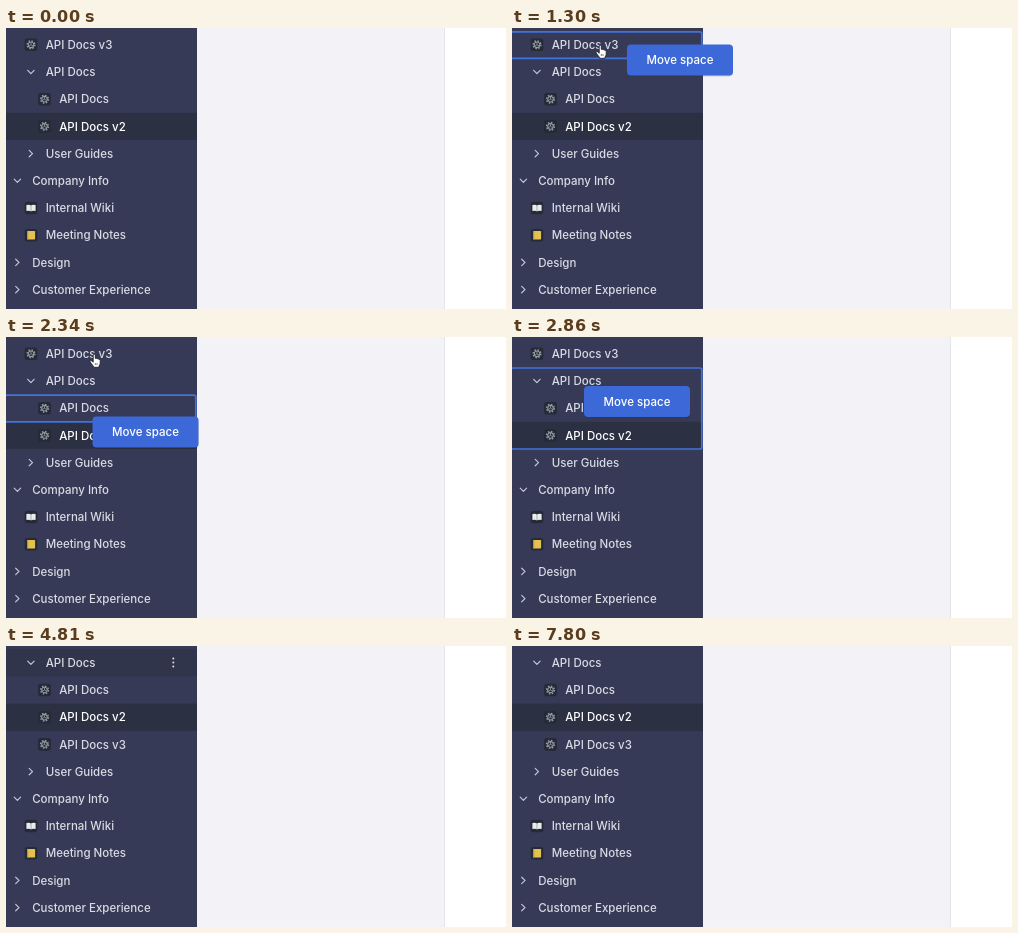
Animation, 500 px wide and 281 px high, one loop 8.97 s. Source, as an HTML page:

```html
<!DOCTYPE html>
<html lang="en">
<head>
<meta charset="utf-8">
<title>Move a space</title>
<style>
html, body { margin: 0; width: 100%; height: 100%; overflow: hidden; background: #fff; }
svg { display: block; width: 500px; height: 281px; }
text { font: 500 11.5px Inter, "Open Sans", sans-serif; fill: #d9dbe4; }
.line { fill: none; stroke: #c3c6d2; stroke-width: 1.2; stroke-linecap: round; stroke-linejoin: round; }
</style>
</head>
<body>
<svg id="stage" viewBox="0 0 500 281"></svg>
<script>
const LOOP = 8970, STEP = 130, ROW = 27.2, TOP = 3.2, SIDE = 191;
const stage = document.getElementById('stage');

// name, indent level, icon
const v3 = ['API Docs v3', 1, 'gear'];
const group = ['API Docs', 1, 'open'];
const docs = ['API Docs', 2, 'gear'];
const v2 = ['API Docs v2', 2, 'gear'];
const rest = [
  ['User Guides', 1, 'closed'], ['Company Info', 0, 'open'],
  ['Internal Wiki', 1, 'book'], ['Meeting Notes', 1, 'note'],
  ['Design', 0, 'closed'], ['Customer Experience', 0, 'closed']
];
const before = [v3, group, docs, v2, ...rest];
const after = [group, docs, v2, ['API Docs v3', 2, 'gear'], ...rest];

// time, hovered row (-1: none)
const hovers = [[0, -1], [260, 9], [390, 6], [520, 3], [650, 0], [1170, -1], [3900, 1],
  [4810, 0], [7150, 1], [7280, 2], [7410, 3], [7540, 4], [7670, 6], [7800, -1]];
// time, left, top of the dragged label
const drag = [[1170, 103, 16], [1300, 115, 16.5], [1560, 148, 25], [1690, 153, 36],
  [1950, 132, 62], [2080, 112, 73], [2340, 86.5, 79.5], [2600, 78, 65], [2860, 72, 49]];

const rect = (x, y, w, h, fill, r = 0, more = '') =>
  `<rect x="${x}" y="${y}" width="${w}" height="${h}" rx="${r}" fill="${fill}" ${more}/>`;
const at = (x, y, body) => `<g transform="translate(${x} ${y})">${body}</g>`;
const tile = rect(-6.3, -6.3, 12.6, 12.6, '#252a37', 2.5);
const icons = {
  open: '<path class="line" d="M-3.2-1.7 0 1.6 3.2-1.7"/>',
  closed: '<path class="line" d="M-1.7-3.2 1.6 0-1.7 3.2"/>',
  gear: tile + `<g fill="none" stroke="#969da6">
    <circle r="3.9" stroke-width="1.4" stroke-dasharray="1.53 1.53"/>
    <circle r="2.8" stroke-width="1.1"/><path d="M0 0V-2.8M0 0-2.4 1.4M0 0 2.4 1.4" stroke-width=".8"/></g>`,
  book: tile + `<path d="M-4.6-2.9Q-2-3.8 0-2.6 2-3.8 4.6-2.9V3Q2 2.2 0 3.3-2 2.2-4.6 3Z" fill="#e9ebed"/>
    <path d="M0-2.6V3.3" stroke="#8d949c" stroke-width=".7"/>`,
  note: tile + rect(-3.9, -4.3, 8, 8.6, '#e5c14f', .7) + rect(-3.9, -4.3, 1.2, 8.6, '#b9943a')
};
const dots = [-4, 0, 4].map(y => `<circle cy="${y}" r="1" fill="#d9dbe4"/>`).join('');
const hand = `<path d="M-1.8-6.2Q-.6-7.4.3-6V-2.6Q1.4-3.2 2-2.3 3.2-2.8 3.7-1.8 5-2 5.2-.7V2.2
  Q5 4 4 5V6.3H-1.6V5.2Q-3.6 3-5 .6-5-.8-3.6-.3L-1.8 1.2Z" fill="#fff" stroke="#22252f" stroke-width=".9" stroke-linejoin="round"/>
  <path d="M.3 2V4M2 2V4" stroke="#22252f" stroke-width=".6"/>`;

function row([name, level, icon], i, hover) {
  const y = TOP + ROW * (i + .5), x = 12.2 + 13.5 * level;
  const active = name === 'API Docs v2';
  const fill = active ? '#2b3042' : hover ? '#31354c' : '';
  const chevron = icon === 'open' || icon === 'closed';
  return (fill && rect(0, TOP + ROW * i, SIDE, ROW, fill)) +
    at(chevron ? x - .8 : x - .7, y, icons[icon]) +
    `<text x="${x + 14}" y="${y + 4.2}" ${active ? 'style="fill:#fff"' : ''}>${name}</text>` +
    (hover ? at(167.3, y - .3, dots) : '');
}

function dragPoint(t) {
  const i = Math.max(1, drag.findIndex(p => p[0] >= t));
  const [a, b] = t > 2860 ? [drag.at(-1), drag.at(-1)] : [drag[i - 1], drag[i]];
  const k = a === b ? 0 : (t - a[0]) / (b[0] - a[0]);
  return [a[1] + (b[1] - a[1]) * k, a[2] + (b[2] - a[2]) * k];
}

function label(t) {
  const [x, y] = dragPoint(t);
  const i = Math.floor((y - 8 - TOP) / ROW);
  const span = i === 1 ? 3 : 1; // an open group is outlined with its children
  return rect(-1, TOP + ROW * i + .6, SIDE - .2, ROW * span - .6, 'none', 2, 'stroke="#4272dd" stroke-width="1.7"') +
    (t >= 2600 ? '' : at(89, 24, hand)) +
    rect(x, y + 1, 106, 31, '#1c2340', 4, 'opacity=".18"') +
    rect(x, y, 106, 31, '#3c69d7', 4) +
    `<text x="${x + 53}" y="${y + 19.8}" text-anchor="middle" style="fill:#fff">Move space</text>`;
}

function draw(t) {
  const hover = hovers.findLast(h => h[0] <= t)[1];
  const rows = t < 4810 ? before : after;
  stage.innerHTML = rect(0, 0, SIDE, 281, '#363a56') + rect(SIDE, 0, 248, 281, '#f2f2f7') +
    rect(438, 0, 1, 281, '#e5e5ec') +
    rows.map((r, i) => row(r, i, i === hover)).join('') +
    (t >= 910 && t < 1170 ? at(89, 24, hand) : '') +
    (t >= 1170 && t < 3900 ? label(t) : '');
}

const start = performance.now();
let last = -1;
function tick() {
  const t = Math.floor(Math.max(0, performance.now() - start) % LOOP / STEP) * STEP;
  if (t !== last) draw(last = t);
  requestAnimationFrame(tick);
}
tick();
</script>
</body>
</html>
```
